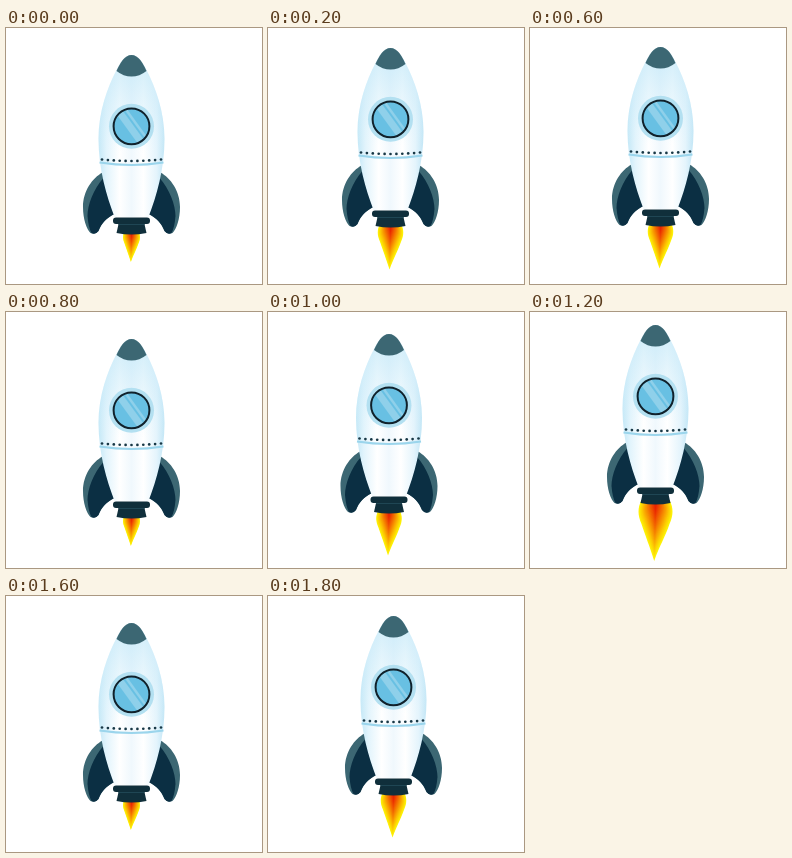
Write an HTML page with a canvas that moves like this. It is 256x256 px and loops after 2000 ms.

```html
<!DOCTYPE html>
<html lang="en">
<head>
<meta charset="utf-8">
<title>Rocket</title>
<style>
  html, body { margin: 0; width: 100%; height: 100%; overflow: hidden; background: #fff; }
  canvas { display: block; width: 256px; height: 256px; }
</style>
</head>
<body>
<canvas id="stage" width="256" height="256"></canvas>
<script>
const ctx = document.getElementById('stage').getContext('2d');
const STEP = 200;
const CENTER = 125.5;
const DARK = '#102f3b';
const NAVY = '#0b2f43';
const TEAL = '#3c6773';

// Offset of the rocket and size of its flame, held for one step each
const poses = [
  [0, 0, 0.5], [-3, -7, 0.75], [0, -14, 1], [5, -8, 0.75], [0, 0, 0.5],
  [-4.5, -5, 0.75], [0, -14, 1], [3.5, -5, 0.75], [0, 0, 0.5], [0, -7, 0.75]
];

const hull = new Path2D(
  'M0 27 C6 27 11 34 15 42 C24 59 33 84 33 111 C33 141 25 168 17 189 ' +
  'H-17 C-25 168 -33 141 -33 111 C-33 84 -24 59 -15 42 C-11 34 -6 27 0 27Z');
const cap = new Path2D('M0 27 C7 27 11.5 35 15 43 Q8 48.5 0 48.5 Q-8 48.5 -15 43 C-11.5 35 -7 27 0 27Z');
const fin = new Path2D(
  'M29 144.5 C39 150 48.5 163 48.5 179 C48.5 191 45 201 41 205 ' +
  'Q36 207 33 203 C30 195 25 190 17 186 C22 174 26 162 29 144.5Z');
const finFace = new Path2D(
  'M28 150 C38 161 44 177 44 188 Q43 200 40 205 Q36 207 33 203 ' +
  'C30 195 25 190 17 186 C22 175 25 164 28 150Z');
const flame = new Path2D('M-14 -3 C-18 5 -18 12 -14 21 C-10 33 -6 43 -1.3 58 C4 43 10 33 14 21 C18 12 18 5 14 -3Z');

function gradient(g, stops) {
  stops.forEach(([at, color]) => g.addColorStop(at, color));
  return g;
}

function fill(path, style) {
  ctx.fillStyle = style;
  ctx.fill(path);
}

function disc(x, y, r, style) {
  ctx.fillStyle = style;
  ctx.beginPath();
  ctx.arc(x, y, r, 0, Math.PI * 2);
  ctx.fill();
}

const hullShade = gradient(ctx.createLinearGradient(-33, 0, 33, 0), [
  [0, '#c4e8f7'], [0.12, '#e2f4fc'], [0.32, '#ffffff'], [0.5, '#f0f8fd'],
  [0.68, '#ffffff'], [0.88, '#e4f4fc'], [1, '#c2e6f6']
]);
const topShade = gradient(ctx.createLinearGradient(0, 40, 0, 125), [
  [0, 'rgba(184,228,247,.6)'], [0.55, 'rgba(200,234,249,.35)'], [1, 'rgba(225,245,253,0)']
]);

// Nested copies of the flame blend from a yellow rim to a red core
function drawFlame(size) {
  const layers = 24;
  ctx.save();
  ctx.translate(0, 205);
  ctx.scale(size, size);
  for (let i = 0; i < layers; i++) {
    const depth = i / layers;
    ctx.save();
    ctx.scale(1 - depth, 1 - depth * 0.9);
    fill(flame, `hsl(${58 - 52 * depth}, 98%, ${51 - 5 * depth}%)`);
    ctx.restore();
  }
  ctx.restore();
}

function drawFins() {
  for (const side of [-1, 1]) {
    ctx.save();
    ctx.scale(side, 1);
    fill(fin, TEAL);
    fill(finFace, NAVY);
    ctx.restore();
  }
}

function drawNozzle() {
  ctx.fillStyle = DARK;
  ctx.beginPath();
  ctx.moveTo(-12.5, 194);
  ctx.lineTo(12.5, 194);
  ctx.lineTo(15, 205);
  ctx.quadraticCurveTo(0, 208, -15, 205);
  ctx.fill();
  ctx.fillStyle = '#1f4654';
  ctx.fillRect(-13, 196, 26, 1);
  ctx.fillStyle = DARK;
  ctx.beginPath();
  ctx.roundRect(-18.5, 189.5, 37, 6.5, 3);
  ctx.fill();
}

function drawBand() {
  ctx.strokeStyle = '#9bd5ec';
  ctx.lineWidth = 2;
  ctx.beginPath();
  ctx.moveTo(-32, 134.5);
  ctx.quadraticCurveTo(0, 139.5, 32, 134.5);
  ctx.stroke();
  for (let i = -5; i <= 5; i++) {
    disc(i * 5.9, 133 - 0.06 * i * i, 1.35, '#183846');
  }
}

function drawWindow() {
  ctx.save();
  ctx.translate(0, 98.3);
  disc(0, 0, 22.5, '#b3e0f1');
  disc(0, 0, 18, '#68c0e3');
  ctx.save();
  ctx.beginPath();
  ctx.arc(0, 0, 17, 0, Math.PI * 2);
  ctx.clip();
  ctx.rotate(Math.PI * 0.3);
  ctx.fillStyle = '#8fd0ea';
  ctx.fillRect(-20, -2, 40, 7);
  ctx.fillRect(-20, -6.5, 40, 2.5);
  ctx.restore();
  ctx.strokeStyle = '#10212b';
  ctx.lineWidth = 2;
  ctx.beginPath();
  ctx.arc(0, 0, 17.9, 0, Math.PI * 2);
  ctx.stroke();
  ctx.restore();
}

function draw(now) {
  const [dx, dy, size] = poses[Math.floor(now / STEP) % poses.length];
  ctx.fillStyle = '#fff';
  ctx.fillRect(0, 0, 256, 256);
  ctx.save();
  ctx.translate(CENTER + dx, dy);
  drawFlame(size);
  drawFins();
  fill(hull, hullShade);
  fill(hull, topShade);
  fill(cap, TEAL);
  drawBand();
  drawWindow();
  drawNozzle();
  ctx.restore();
}

const start = performance.now();
function tick() {
  draw(performance.now() - start);
  requestAnimationFrame(tick);
}
tick();
</script>
</body>
</html>
```
